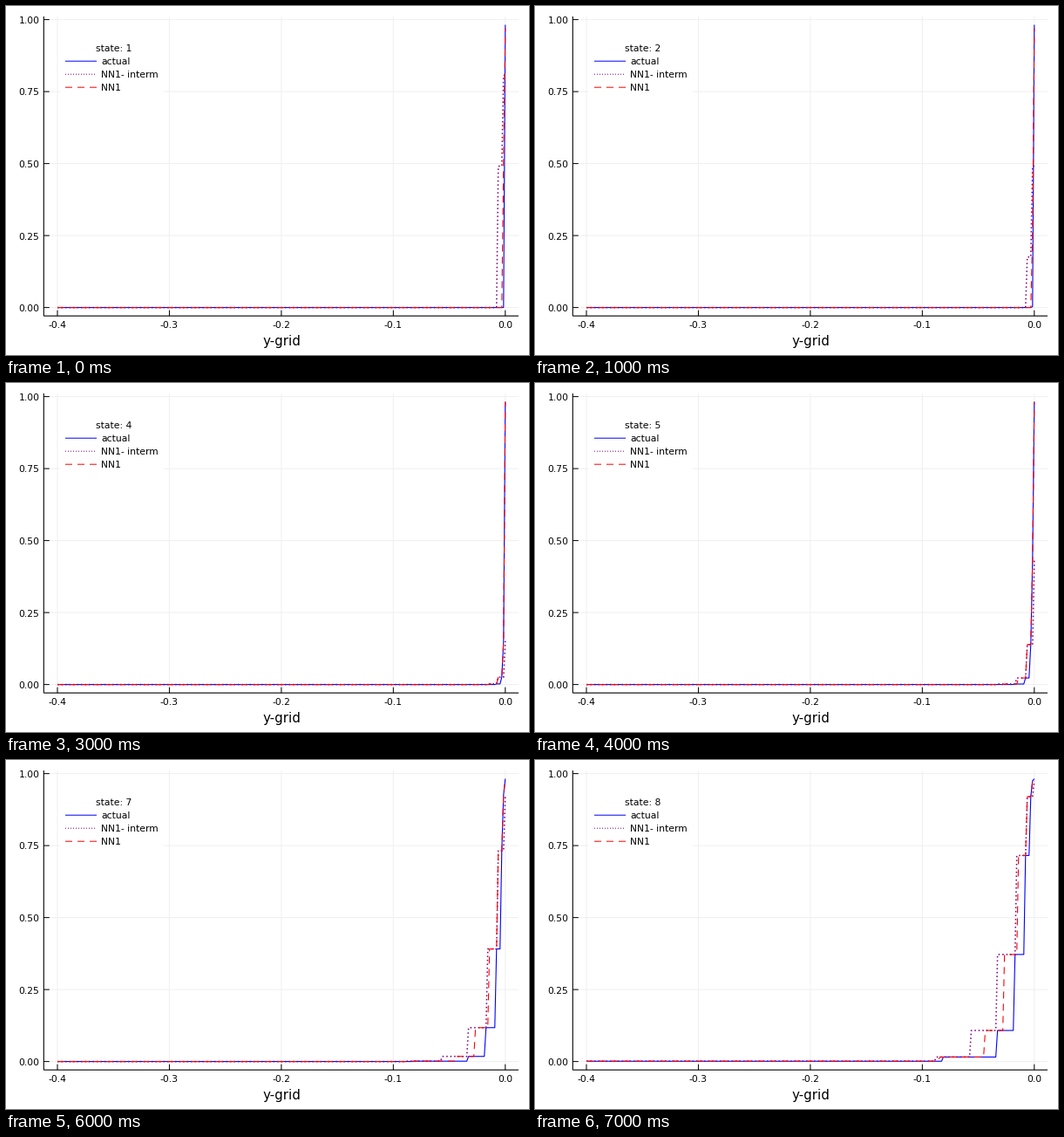
Animation, 600 px wide and 400 px high, one loop 8 s. Source, as a matplotlib script:

```python
import math

import matplotlib.pyplot as plt
from matplotlib.animation import FuncAnimation
from matplotlib.patches import Rectangle

W, H, DPI = 600, 400, 100
PT = 72 / DPI                      # points per pixel
X0, XSCALE = 572.8, 1284.5         # pixel of x = 0, pixels per unit
Y0, YSCALE = 345.6, 330
CELLS = 256
STEP = 0.4 * XSCALE / CELLS        # grid spacing in pixels
LEFT, RIGHT, TOP, BOTTOM = 43.3, 588, 12, 355.2
TICK = 6.5
DASH, DOT = (8, 6), (1, 2)
CAP = 0.982                        # highest value of the curves

# last cell of each plateau, counted leftwards from x = 0
ACTUAL_ENDS = [0, 1, 2, 5, 11, 21, 52, CELLS]
NET_ENDS = [0, 1, 4, 9, 17, 28, 54, CELLS]
INTERM_ENDS = [0, 4, 10, 21, 36, 56, CELLS]
UNTRAINED_ENDS = [1, 4, CELLS]
TRAINED_FROM = 4                   # first state where the networks fit well

plt.rcParams["font.family"] = "DejaVu Sans"
plt.rcParams["lines.scale_dashes"] = False

fig = plt.figure(figsize=(W / DPI, H / DPI), dpi=DPI, facecolor="white")
ax = fig.add_axes([0, 0, 1, 1])
ax.set_xlim(0, W)
ax.set_ylim(H, 0)
ax.axis("off")


def px(x):
    return X0 + x * XSCALE


def py(y):
    return Y0 - y * YSCALE


def stroke(xs, ys, color, width=1.1, dashes=None, z=3):
    line, = ax.plot(xs, ys, color=color, lw=width * PT, zorder=z, snap=False,
                    solid_capstyle="butt", dash_capstyle="butt")
    if dashes:
        line.set_dashes([d * PT for d in dashes])
    return line


def label(x, y, text, size=10.8, ha="center"):
    return ax.text(x, y, text, fontsize=size * PT, ha=ha, va="baseline",
                   color="black", zorder=5)


def level(z):
    """Capped normal distribution function."""
    return CAP * (1 + math.erf(z / math.sqrt(2))) / 2


def true_levels(state):
    """Plateau heights from right to left; each state moves up one step."""
    steps = range(1, len(ACTUAL_ENDS))
    return [CAP] + [level(0.918 * (state - 4 - i) + 0.099 - 0.051 * state)
                    for i in steps]


def interm_curve(state):
    if state < TRAINED_FROM:
        heights = [level(0.92 * (2 - state - j)) for j in range(2)]
        return plateaus(UNTRAINED_ENDS, heights + [0])
    return plateaus(INTERM_ENDS, true_levels(state)[1:])


def net_curve(state):
    heights = true_levels(state)
    if state < TRAINED_FROM:
        heights[:2] = 0.97, 0.5 / state
    return plateaus(NET_ENDS, heights)


def plateaus(ends, heights):
    """Pixel path of a step curve, drawn from left to right."""
    xs, ys, start = [], [], 0
    for end, height in zip(ends, heights):
        for k in sorted({start, end}):
            xs.append(X0 - k * STEP)
            ys.append(py(height))
        start = end + 1
    return xs[::-1], ys[::-1]


def draw_axes():
    for i in range(5):
        x, y = px(-0.1 * i), py(0.25 * i)
        stroke([x, x], [TOP, BOTTOM], "#f0f0f0", 1, z=1)
        stroke([LEFT, RIGHT], [y, y], "#f0f0f0", 1, z=1)
        stroke([x, x], [BOTTOM, BOTTOM - TICK], "black", 1)
        stroke([LEFT, LEFT + TICK], [y, y], "black", 1)
        label(x - 0.3, 369, f"{-0.1 * i if i else 0:.1f}")
        label(38.5, y + 4.4, f"{0.25 * i:.2f}", ha="right")
    stroke([LEFT, LEFT], [TOP, BOTTOM], "black")
    stroke([LEFT, RIGHT], [BOTTOM, BOTTOM], "black")
    label(316, 389, "y-grid", 15)


def draw_legend():
    ax.add_patch(Rectangle((62, 40), 119, 61, fc="white", ec="none", zorder=2))
    entries = [("actual", "blue", None), ("NN1- interm", "purple", DOT),
               ("NN1", "red", DASH)]
    for i, (name, color, dashes) in enumerate(entries):
        y = 63.2 + 15 * i
        stroke([68, 104], [y, y], color, 1, dashes)
        label(109, y + 4, name, ha="left")


draw_axes()
draw_legend()
title = label(123.3, 52, "")
actual = stroke([], [], "blue", z=4)
interm = stroke([], [], "purple", 1.6, [1.5 * d for d in DOT], z=4)
net = stroke([], [], "red", dashes=DASH, z=4)


def update(frame):
    state = frame + 1
    title.set_text(f"state: {state}")
    actual.set_data(*plateaus(ACTUAL_ENDS, true_levels(state)))
    interm.set_data(*interm_curve(state))
    net.set_data(*net_curve(state))
    return title, actual, interm, net


anim = FuncAnimation(fig, update, frames=8, interval=1000, repeat=True,
                     repeat_delay=0, blit=False)
plt.show()
```
